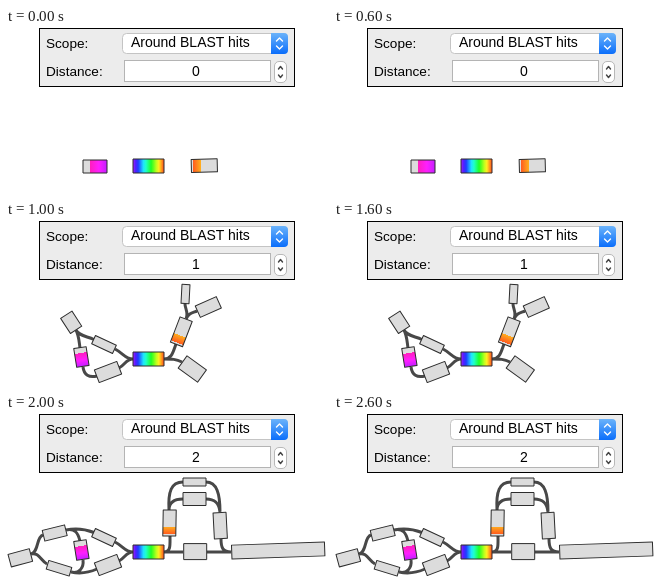
These frames come from a looping animation (322 by 165 pixels, 3000 ms). An HTML page:

```html
<!DOCTYPE html>
<html lang="en">
<head>
<meta charset="utf-8">
<title>Graph scope by distance</title>
<style>
  html, body { margin: 0; width: 100%; height: 100%; overflow: hidden; background: #fff; }
  svg { display: block; width: 322px; height: 165px; }
  text { font: 14px "Liberation Sans", Arial, sans-serif; fill: #000; }
  .label { font-size: 13.6px; }
  .edge { fill: none; stroke: #484848; stroke-width: 3; }
  .node { stroke: #2c2c2c; stroke-width: 1; stroke-linejoin: round; }
  .chevron { fill: none; stroke-width: 1.4; stroke-linecap: round; stroke-linejoin: round; }
</style>
</head>
<body>
<svg id="stage" viewBox="0 0 322 165">
  <defs>
    <linearGradient id="blue" x2="0" y2="1">
      <stop stop-color="#6bb3fa"/><stop offset="1" stop-color="#0b6efb"/>
    </linearGradient>
  </defs>

  <rect x="33.5" y=".5" width="255" height="58" fill="#ececec" stroke="#000"/>
  <text class="label" x="40" y="20">Scope:</text>
  <text class="label" x="40" y="48">Distance:</text>

  <rect x="116.5" y="5.5" width="165" height="20" rx="4" fill="#fff" stroke="#c4c4c4"/>
  <path d="M265 5H278a4 4 0 0 1 4 4V22a4 4 0 0 1-4 4H265Z" fill="url(#blue)"/>
  <path class="chevron" stroke="#fff" d="M270.5 13l3-3 3 3M270.5 18l3 3 3-3"/>
  <text x="125" y="19">Around BLAST hits</text>

  <rect x="118.5" y="32.5" width="146" height="21" fill="#fff" stroke="#b4b4b4"/>
  <rect x="268.5" y="33.5" width="12" height="21" rx="4.5" fill="#fff" stroke="#b8b8b8"/>
  <path class="chevron" stroke="#444" d="M272.5 41l2-2.5 2 2.5M272.5 47l2 2.5 2-2.5"/>
</svg>
<script>
const stage = document.getElementById('stage');
const LOOP = 3000;
const GREY = '#dcdcdc';

function add(parent, tag, attrs, text) {
  const el = document.createElementNS('http://www.w3.org/2000/svg', tag);
  for (const key in attrs) el.setAttribute(key, attrs[key]);
  if (text !== undefined) el.textContent = text;
  parent.appendChild(el);
  return el;
}

// Grey node whose stretch from..to runs through a range of hues.
function hit(id, from, to, hueA, hueB) {
  const gradient = add(stage.querySelector('defs'), 'linearGradient', { id });
  const stop = (offset, color) => add(gradient, 'stop', { offset, 'stop-color': color });
  stop(from, GREY);
  for (let i = 0; i <= 12; i++) {
    const t = i / 12;
    stop(from + (to - from) * t, `hsl(${hueA + (hueB - hueA) * t} 100% 56%)`);
  }
  stop(to, GREY);
  return `url(#${id})`;
}

const pinkFill = hit('pink', 0.29, 1, 318, 284);
const rainbow = hit('rainbow', 0, 1, 276, 12);
const orange = hit('orange', 0.07, 0.36, 16, 38);

// Node: centre x, centre y, length, thickness, angle, fill
const hub = [142.5, 138, 31, 14, 0, rainbow];
const pink = [75.4, 136, 19, 12.5, 81, pinkFill];
const upper = [98, 123.5, 23, 9, 25];
const lower = [102, 151, 24, 13.5, -21];
const join = 'M109 128C117 132 119 138 127 138M113 147C119 144 120 138 127 138';

const scenes = [
  {
    edges: '',
    nodes: [[89, 138.5, 24, 13, 0, pinkFill], hub, [198.3, 137.7, 26, 13, -1.5, orange]]
  },
  {
    edges: join + 'M70 109C73 115 73 120 74 127M70 109C73 115 80 115 88 118.5' +
      'M77 146C78 154 83 157 91 155M158 138C166 138 167 131 170 123M158 138C166 138 170 138 176 141' +
      'M180 98C183 92 179 88 179 83M180 98C183 92 186 92 191 90',
    nodes: [
      [65.2, 101.3, 18, 13.5, 57], pink, upper, lower, hub,
      [175.3, 110.8, 27, 13, -69, orange],
      [179.5, 73, 19, 8, -87], [202.3, 86, 23, 12.5, -24], [186.3, 148, 24, 15, 36]
    ]
  },
  {
    edges: join + 'M25 140C33 138 30 123 37 121M25 140C33 138 35 147 41 150' +
      'M60 116C69 114 72 119 74 127M60 116C69 114 79 115 88 118.5' +
      'M65 158C73 160 78 154 77 146M65 158C74 160 82 159 91 155' +
      'M158 138C165 138 164 131 164 122M158 138C165 138 169 138 177 138' +
      'M201 138C209 138 217 138 225 138M215 125C215 134 217 138 225 138' +
      'M163 96C162 78 165 68 177 68M163 96C163 88 168 85 177 85' +
      'M200 68C211 68 214 80 214 98M200 85C209 85 213 89 214 98',
    nodes: [
      [14.3, 143.8, 22, 13, -15], [48.7, 119, 23, 11, -14], [53, 154.3, 24, 9, 17],
      pink, upper, lower, hub,
      [163.5, 109, 26, 13, -89, orange],
      [188.5, 68, 23, 8, 0], [188.5, 85, 23, 13, 0], [214.2, 111.6, 26, 13, 87],
      [189.2, 137.6, 23, 16, 0], [272.2, 136.5, 93, 14, -2]
    ]
  }
];

scenes.forEach(({ edges, nodes }, i) => {
  const group = add(stage, 'g', {});
  add(group, 'text', { x: 190, y: 48, 'text-anchor': 'middle' }, i);
  add(group, 'path', { class: 'edge', d: edges });
  for (const [x, y, w, h, angle, fill = GREY] of nodes) {
    add(group, 'rect', {
      class: 'node', x: -w / 2, y: -h / 2, width: w, height: h, fill,
      transform: `translate(${x} ${y}) rotate(${angle})`
    });
  }
  const steps = [0, 1, 2, 3].map(k => ({
    opacity: k === i ? 1 : 0, offset: k / 3, easing: 'step-end'
  }));
  group.animate(steps, { duration: LOOP, iterations: Infinity }).startTime = 0;
});
</script>
</body>
</html>
```
